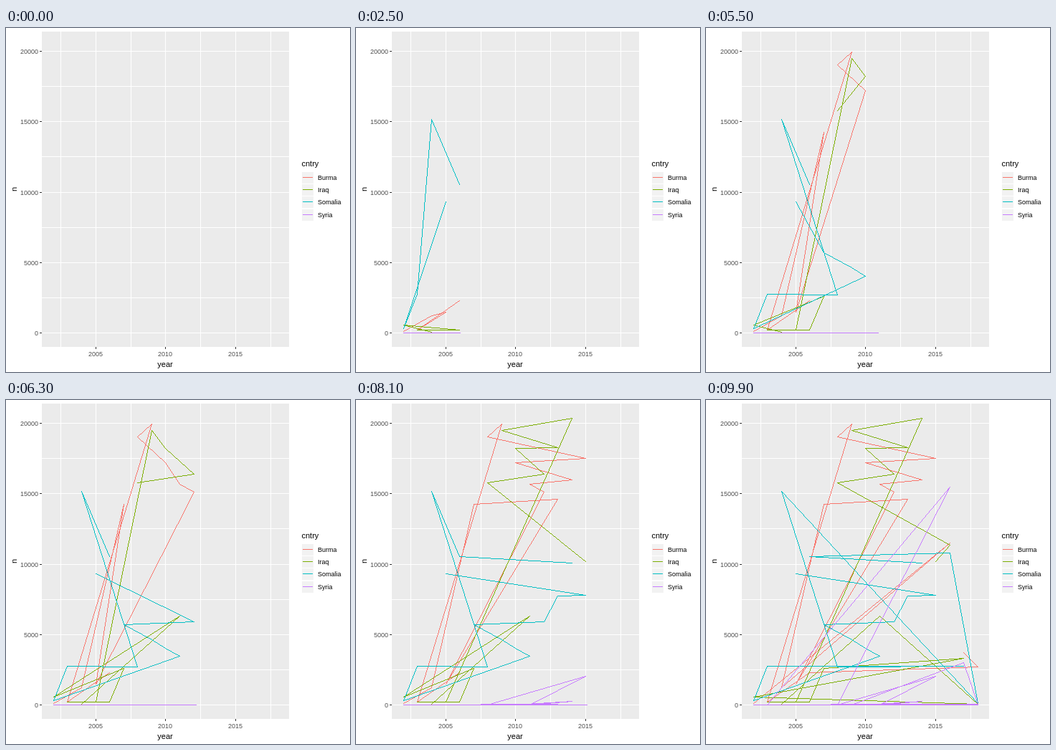
An HTML page with a canvas for the animation above (10000 ms loop, 480x480 px).

```html
<!DOCTYPE html>
<html lang="en">
<head>
<meta charset="utf-8">
<title>Arrivals by year</title>
<style>
  html, body { margin: 0; width: 100%; height: 100%; overflow: hidden; background: #fff; }
  canvas { display: block; width: 480px; height: 480px; }
</style>
</head>
<body>
<canvas id="chart" width="480" height="480"></canvas>
<script>
const ctx = document.getElementById('chart').getContext('2d');
const FONT = '"Liberation Sans", Arial, sans-serif';
const FIRST = 2002, LAST = 2018, STEPS = 100, STEP_MS = 100;
const xOf = year => Math.floor(66.4 + (year - FIRST) * 19.57);
const yOf = n => Math.floor(425.6 - n * 0.01965);

// Key values from FIRST to LAST; gaps are filled by geometric growth.
const series = [
  makeSeries('Burma', '#F8766D',
    [100, 220, 1250, 1500, 2290, 14230, 19030, 19960, 17220, 15700, , 14600, , 17520, 11530, 3720, 2680]),
  makeSeries('Iraq', '#7CAE00',
    [560, 208, 64, 205, 212, 2600, 15780, 19500, 18240, 6300, 16380, , 20350, 10200, 11350, 3320, 58]),
  makeSeries('Somalia', '#00BFC4',
    [310, 2750, 15160, 9320, 10540, 5700, 2680, 4640, , 3470, 5910, , 10080, 7770, 10800, 2740, 120]),
  makeSeries('Syria', '#C77CFF',
    [4, 15, 5, , , 8, 17, 30, , 24, , 35, , , 15470, 3000, 31])
];

function makeSeries(name, color, keys) {
  const points = [];
  let from = 0;
  keys.forEach((value, to) => {
    for (let i = from + 1; i < to; i++) {
      const grown = keys[from] * (value / keys[from]) ** ((i - from) / (to - from));
      points.push({ year: FIRST + i, n: Math.round(grown) });
    }
    points.push({ year: FIRST + to, n: value });
    from = to;
  });
  // The paths join their points in alphabetical order of the values.
  points.sort((a, b) => String(a.n) < String(b.n) ? -1 : 1);
  return { name, color, points };
}

function rect(x, y, w, h, color) {
  ctx.fillStyle = color;
  ctx.fillRect(x, y, w, h);
}

function text(str, x, y, size, color = '#000', align = 'left') {
  ctx.font = `${size}px ${FONT}`;
  ctx.fillStyle = color;
  ctx.textAlign = align;
  ctx.fillText(str, x, y);
}

// Crisp one-pixel line between two data points.
function line(a, b, color) {
  const x = xOf(a.year), y = yOf(a.n);
  const dx = xOf(b.year) - x, dy = yOf(b.n) - y;
  const length = Math.max(Math.abs(dx), Math.abs(dy), 1);
  for (let i = 0; i <= length; i++) {
    rect(Math.round(x + dx * i / length), Math.round(y + dy * i / length), 1, 1, color);
  }
}

function drawAxes() {
  rect(0, 0, 480, 480, '#fff');
  rect(50, 5, 345, 440, '#EBEBEB');
  for (let n = 0; n <= 20000; n += 2500) rect(50, yOf(n), 345, 1, '#fff');
  for (let year = 2002.5; year < LAST; year += 2.5) rect(xOf(year), 5, 1, 440, '#fff');
  for (let n = 0; n <= 20000; n += 5000) {
    rect(47, yOf(n), 3, 1, '#333');
    text(n, 45, yOf(n) + 4, 9, '#4D4D4D', 'right');
  }
  for (let year = 2005; year <= 2015; year += 5) {
    rect(xOf(year), 445, 1, 3, '#333');
    text(year, xOf(year), 458, 9, '#4D4D4D', 'center');
  }
  text('year', 222, 473, 11, '#000', 'center');
  ctx.save();
  ctx.translate(15, 225);
  ctx.rotate(-Math.PI / 2);
  text('n', 0, 0, 11, '#000', 'center');
  ctx.restore();
}

function drawLegend() {
  text('cntry', 412.5, 193, 11);
  series.forEach(({ name, color }, i) => {
    const middle = Math.floor(208.2 + i * 17.28);
    rect(413, middle - 7, 16, 16, '#F2F2F2');
    rect(414, middle, 14, 1, color);
    text(name, 435, middle + 4, 9);
  });
}

function drawSeries({ points, color }, now) {
  const seen = points.filter(p => p.year <= now);
  for (let i = 1; i < seen.length; i++) line(seen[i - 1], seen[i], color);
}

// The baseline jumps year by year at first, then grows steadily.
function drawBaseline(now, color) {
  const end = now < 2006 ? Math.floor(now) : now;
  if (end > FIRST) line({ year: FIRST, n: 0 }, { year: end, n: 0 }, color);
}

function draw(ms) {
  const step = Math.floor(ms / STEP_MS) % STEPS;
  const now = FIRST + (LAST - FIRST) * step / (STEPS - 1);
  drawAxes();
  drawLegend();
  for (const s of series) drawSeries(s, now);
  drawBaseline(now, series[3].color);
}

const start = performance.now();
function tick() {
  draw(performance.now() - start);
  requestAnimationFrame(tick);
}
tick();
</script>
</body>
</html>
```
